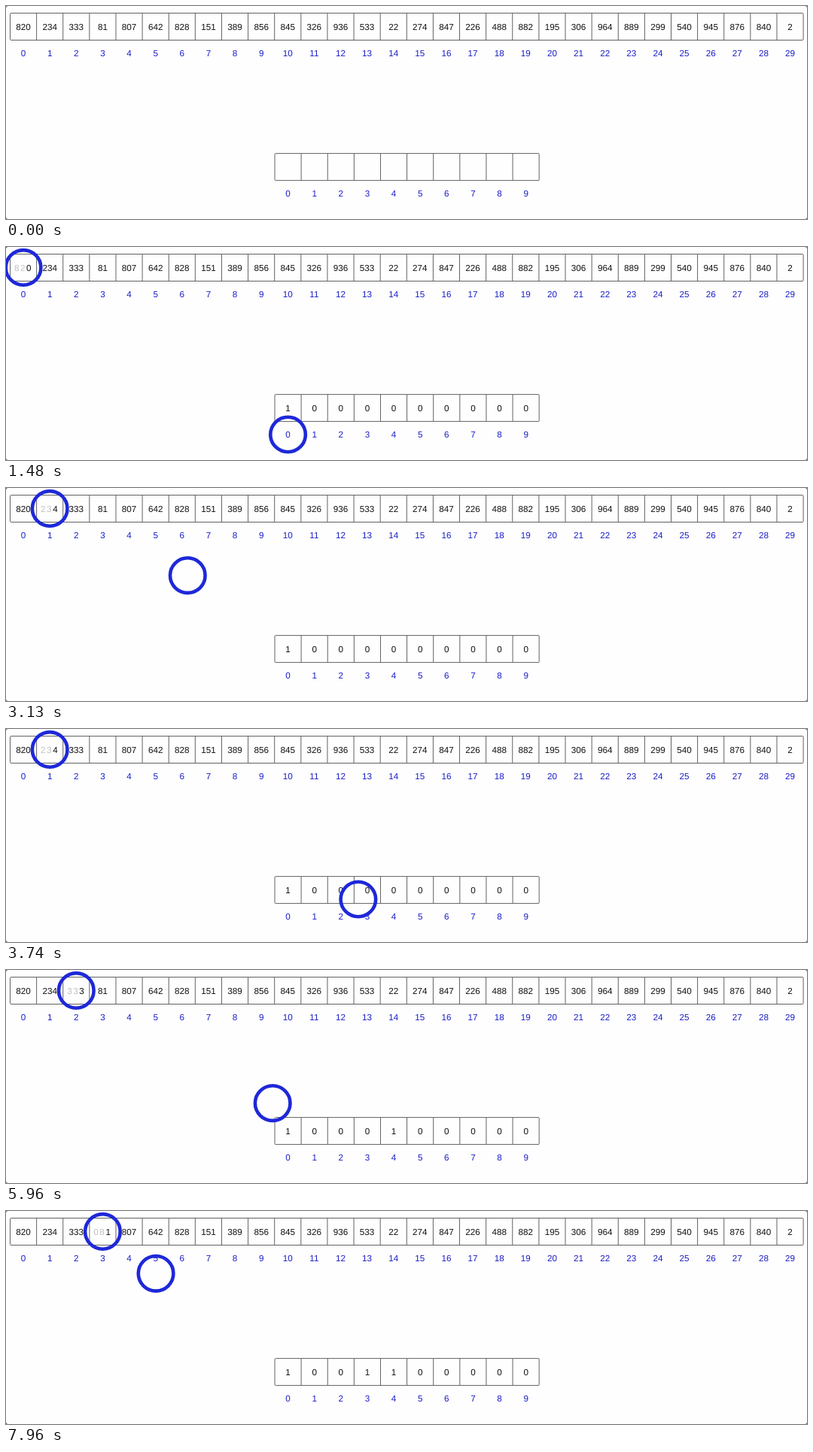
Recreate the animation shown at these times as an HTML page. Size 1064 by 284 pixels, loop 8 s.

```html
<!DOCTYPE html>
<html lang="en">
<head>
<meta charset="utf-8">
<title>Radix sort: counting digits</title>
<style>
  html, body { margin: 0; width: 100%; height: 100%; overflow: hidden; background: #555; }
  svg { display: block; width: 1064px; height: 284px; background: #fefefe; border-radius: 3px; }
  text { font: 11.7px "Liberation Sans", Arial, sans-serif; text-rendering: geometricPrecision; text-anchor: middle; fill: #111; }
  .index { fill: #1a1ec8; }
  .faint { opacity: .26; }
  .box { fill: none; stroke: #626262; stroke-width: 1; }
  .ring { fill: none; stroke: #1e28d8; stroke-width: 4.6; }
</style>
</head>
<body>
<svg id="stage" viewBox="0 0 1064 284"></svg>
<script>
const LOOP = 8000;
const MOVE = 1230;                        // travel time of the ring
const STARTS = [74, 2638, 5131, 7652];    // when each number is taken up
const CELL = 35.12, HEIGHT = 36;
const TOP = { x: 5.5, y: 9.5 }, COUNTS = { x: 357, y: 196.6 };
const VALUES = [820, 234, 333, 81, 807, 642, 828, 151, 389, 856,
                845, 326, 936, 533, 22, 274, 847, 226, 488, 882,
                195, 306, 964, 889, 299, 540, 945, 876, 840, 2];

const stage = document.getElementById('stage');

function add(tag, attrs, content = '') {
  const el = document.createElementNS('http://www.w3.org/2000/svg', tag);
  for (const name in attrs) el.setAttribute(name, attrs[name]);
  el.textContent = content;
  stage.append(el);
  return el;
}

const centre = (row, i) => row.x + CELL * (i + 0.5);
const label = (x, y, content, cls = '') => add('text', { x, y, class: cls }, content);

// Draws a row of cells with indices and returns the value labels.
function buildRow(row, values) {
  add('rect', { x: row.x, y: row.y, width: CELL * values.length, height: HEIGHT, rx: 1.2, class: 'box' });
  return values.map((value, i) => {
    if (i) add('path', { d: `M${row.x + CELL * i} ${row.y}v${HEIGHT}`, class: 'box' });
    label(centre(row, i), row.y + 57.7, i, 'index');
    return label(centre(row, i), row.y + 22.6, value);
  });
}

const numbers = buildRow(TOP, VALUES);
const counters = buildRow(COUNTS, Array(10).fill(''));
const digits = ['faint', 'faint', ''].map(cls => label(0, TOP.y + 22.6, '', cls));
const makeRing = () => add('circle', { r: 23.3, class: 'ring' });
const still = makeRing(), mover = makeRing();

function place(ring, x, y) {
  ring.setAttribute('cx', x);
  ring.setAttribute('cy', y);
}

function render(t) {
  const current = STARTS.filter(s => t >= s).length - 1;
  const active = current >= 0;

  const tally = Array(10).fill(0);
  STARTS.forEach((s, i) => { if (t >= s + MOVE) tally[VALUES[i] % 10]++; });
  counters.forEach((el, i) => { el.textContent = active ? tally[i] : ''; });

  numbers.forEach((el, i) => { el.style.visibility = i === current ? 'hidden' : 'visible'; });
  [still, mover, ...digits].forEach(el => { el.style.visibility = active ? 'visible' : 'hidden'; });
  if (!active) return;

  const x = centre(TOP, current), y = 27.4;
  const p = Math.min(1, (t - STARTS[current]) / MOVE);
  const goal = centre(COUNTS, VALUES[current] % 10);
  place(still, x, y);
  place(mover, x + (goal - x) * p, y + (250 - y) * p);

  const padded = String(VALUES[current]).padStart(3, '0');
  digits.forEach((el, i) => {
    el.setAttribute('x', x + (i - 1) * 8.1 - 0.8);
    el.textContent = padded[i];
  });
}

const begin = performance.now();
function tick() {
  render((performance.now() - begin) % LOOP);
  requestAnimationFrame(tick);
}
tick();
</script>
</body>
</html>
```
